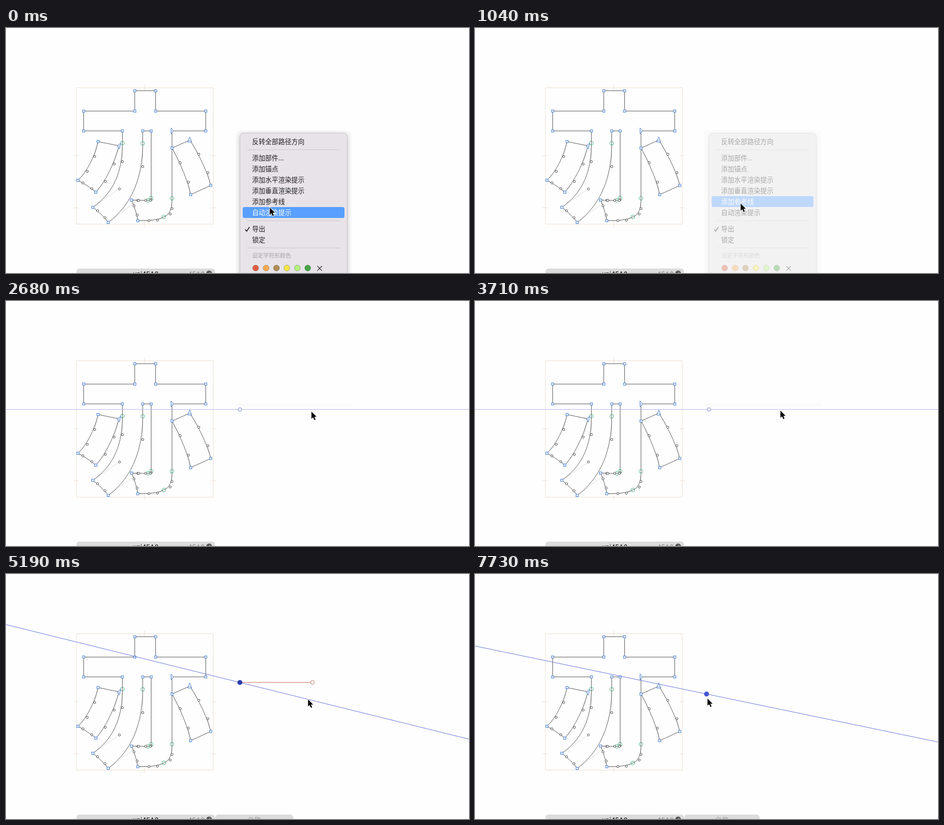
These frames come from a looping animation (933 by 494 pixels, 8000 ms). An HTML page:

```html
<!DOCTYPE html>
<html lang="zh-CN">
<head>
<meta charset="utf-8">
<title>添加参考线</title>
<style>
html, body { margin: 0; width: 100%; height: 100%; overflow: hidden; background: #fefefe; }
svg { display: block; width: 933px; height: 494px; }
text { font-family: "Noto Sans CJK SC", "Noto Sans CJK", sans-serif; }
.latin { font-family: Inter, "Noto Sans", sans-serif; font-size: 13px; }
#sheet { filter: drop-shadow(0 2px 3px rgba(0, 0, 0, .2)); }
</style>
</head>
<body>
<svg id="stage" viewBox="0 0 933 494">
  <g fill="none" stroke="#ecdfd2">
    <rect x="142" y="120.5" width="275.5" height="275"/>
    <path d="M279.5 114V126M279.5 390V401M136 257.5H147M412 257.5H423M136 362.5H147M412 362.5H423"/>
  </g>
  <g id="glyph"></g>
  <rect x="142" y="485" width="279" height="40" rx="6" fill="#dcdcdc"/>
  <text class="latin" x="281.5" y="501.2" text-anchor="middle">uni45A6</text>
  <text class="latin" x="400" y="501.2" text-anchor="end" fill="#858585">45A6</text>
  <circle cx="409.3" cy="494.5" r="5.6" fill="#575757"/>
  <path d="M406.5 494.5H412M409.6 492L412.2 494.5L409.6 497" fill="none" stroke="#ddd"/>
  <g id="panel">
    <rect id="panelBox" x="421.5" y="485" height="40" rx="6" fill="#dcdcdc"/>
    <text id="panelText" y="501" font-size="13.5" text-anchor="middle" fill="#a2a2a2">名称</text>
  </g>
  <rect id="strip" x="461" y="206" width="237" height="6" fill="#fafafa"/>
  <g id="guide">
    <line id="line" x1="0" x2="933"/>
    <g id="arm" fill="none" stroke="#cf6a60">
      <path d="M471 218.5H613.5"/>
      <circle cx="617.5" cy="218.5" r="4"/>
    </g>
    <circle id="knob"/>
  </g>
  <rect id="glow" height="320"/>
  <g id="menu"></g>
  <g id="cursor">
    <path id="badge" d="M6.5 15.5Q8.5 11.5 11 14.5M9.5 13.5H15.5V18.5H9.5ZM11.5 15.5H14" fill="none" stroke="#bdbdbd" stroke-width=".8"/>
    <path d="M0 0V14.6L3.3 11.5L5.8 17L8.3 16L5.8 10.6H10.3Z" stroke="#fff" stroke-width="1.8" paint-order="stroke"/>
  </g>
</svg>
<script>
const LOOP = 8000, BEAT = LOOP / 54;
const $ = id => document.getElementById(id);

function set(el, attrs) {
  for (const k in attrs) el.setAttribute(k, attrs[k]);
}
function add(parent, tag, attrs, text) {
  const el = document.createElementNS('http://www.w3.org/2000/svg', tag);
  set(el, attrs);
  if (text) el.textContent = text;
  return parent.appendChild(el);
}
const show = (el, on) => set(el, { visibility: on ? 'visible' : 'hidden' });
const within = (n, a, b) => n >= a && n < b;
const clamp = p => Math.min(1, Math.max(0, p));
const smooth = p => p * p * (3 - 2 * p);
const easeOut = (p, power) => 1 - (1 - clamp(p)) ** power;
const mix = (a, b, p) => a + (b - a) * p;

// Outline points: c corner, s smooth, o control point
const outlines = [
  `c334.5,207.5 c402.5,207.5 c402.5,167.5 c301.5,167.5 c301.5,126.5 c259.5,126.5 c259.5,167.5
   c156.5,167.5 c156.5,207.5 c234.5,207.5 s234.5,232 o234.5,269.5 o228.5,324.5 c175,361.5
   o184.5,368.5 o199.5,382.5 c206,392 o265.5,347.5 o275.5,279.5 s275.5,232.5 c275.5,207.5
   c292.5,207.5 s292.5,343 o292.3,346.5 o291,347.3 s286,347.5 o281.5,347.5 o267.5,347.5 c253,347
   o258,358.5 o264.3,377 c265.5,388.5 o288,388.5 o305,387.5 s318,381 o331,375 o334.5,364 s334.5,343.3`,
  `c227.5,237.5 c185.5,229 o178.7,259 o163.8,289 c145,307 o155,312.3 o173,324 c181,331
   o200.3,309.3 o218,274.3`,
  `c370.5,226 o388.5,254.5 o406.8,291.8 c412.5,317.5 c372,336 o367.5,310.7 o351,271.7 c334.5,242`
];
const startMarks = 'M332.5 201.5L338.5 207.5L332.5 213.5ZM231 232.3L228.7 244.2L223.7 238ZM370.3 219.5L366 230L374.5 230Z';

function drawGlyph() {
  const g = $('glyph');
  let arms = '', body = '';
  const pts = [];
  for (const src of outlines) {
    const list = src.trim().split(/\s+/).map((s, i) => {
      const [x, y] = s.slice(1).split(',');
      return { kind: s[0], x, y, at: x + ' ' + y, start: !i };
    });
    pts.push(...list);
    const ring = [...list, list[0]];
    body += 'M' + ring[0].at;
    for (let i = 1; i < ring.length; i++) {
      if (ring[i].kind !== 'o') { body += 'L' + ring[i].at; continue; }
      const [a, b, end] = ring.slice(i, i + 3);
      body += `C${a.at} ${b.at} ${end.at}`;
      arms += `M${ring[i - 1].at}L${a.at}M${b.at}L${end.at}`;
      i += 2;
    }
    body += 'Z';
  }
  add(g, 'path', { d: arms, fill: 'none', stroke: '#d2d2d2', 'stroke-width': .8 });
  add(g, 'path', { d: body, fill: 'none', stroke: '#444', 'stroke-width': .9 });
  for (const p of pts) {
    if (p.kind === 'o') add(g, 'circle', { cx: p.x, cy: p.y, r: 2.2, fill: '#fefefe', stroke: '#333', 'stroke-width': .9 });
    else if (p.kind === 's') add(g, 'circle', { cx: p.x, cy: p.y, r: 3.8, fill: 'none', stroke: '#45b382' });
    else if (!p.start) add(g, 'rect', { x: p.x - 2.4, y: p.y - 2.4, width: 4.8, height: 4.8, fill: '#e6effb', stroke: '#4b80cf' });
  }
  add(g, 'path', { d: startMarks, fill: '#e6effb', 'fill-opacity': .6, stroke: '#4b80cf' });
}

// Menu groups start at their first row; rows are 22 apart
const groups = [
  [229.5, '反转全部路径方向'],
  [262.5, '添加部件...', '添加锚点', '添加水平渲染提示', '添加垂直渲染提示', '添加参考线', '自动渲染提示'],
  [405.5, '导出', '锁定']
];
const items = groups.flatMap(([top, ...names]) => names.map((name, i) => ({ name, y: top + 22 * i })));
const swatches = ['#e05c3e', '#f8a94d', '#af8d52', '#f2e647', '#b5ef7e', '#44a444'];
let bar, labels;

function drawMenu() {
  const m = $('menu');
  add(m, 'rect', { id: 'sheet', x: 471.5, y: 212, width: 216, height: 320, rx: 6.5, fill: '#e7e3e8', stroke: '#c6c3c7' });
  add(m, 'path', { d: 'M486 245.5H673M486 388.5H673M486 443.5H673', stroke: '#c9c5ca' });
  bar = add(m, 'rect', { x: 477, width: 205, height: 22, rx: 3.5, fill: '#589fff' });
  labels = items.map(({ name, y }) => add(m, 'text', { x: 496, y: y + 4.4, 'font-size': 13.2 }, name));
  add(m, 'text', { x: 496, y: 463.3, 'font-size': 11.2, fill: '#a5a2a6' }, '设定字符形颜色');
  add(m, 'path', { d: 'M482 406L485 409.7L490.7 401.2', fill: 'none', stroke: '#222', 'stroke-width': 1.7 });
  swatches.forEach((fill, i) => add(m, 'circle', { cx: 503 + 21 * i, cy: 484, r: 6, fill, stroke: '#000', 'stroke-opacity': .25 }));
  add(m, 'path', { d: 'M627.3 480L636.7 489.4M636.7 480L627.3 489.4', stroke: '#222', 'stroke-width': 1.2 });
}

// Beats at which things happen
const PICK = 3, FADE = 7, GUIDE = 8, TURN = 29, LET_GO = 36, DRAG = 41, DROP = 51;
const hub = { x: 471.3, y: 218.7 };

// Free cursor moves: beat, x, y
const path = [
  [0, 531.5, 362], [1, 532, 364], [PICK, 534.5, 354], [GUIDE, 535.5, 354], [12, 615, 222],
  [15, 613, 234.5], [18, 615.5, 223], [25, 615.5, 221], [LET_GO, 608, 247], [40, 474, 220],
  [DROP, 467, 248], [52, 468.5, 251]
];

function knobAt(n) {
  const p = easeOut((n - DRAG + 1) / 7, 4);
  return { x: mix(hub.x, 466.6, p), y: mix(hub.y, 242, p) };
}
function slopeAt(n) {
  return n < TURN ? 0 : n < LET_GO ? .2476 * easeOut((n - TURN + 1) / 7, 2) : .2075;
}
function cursorAt(n) {
  if (within(n, TURN, LET_GO)) {
    const a = Math.atan(slopeAt(n));
    return [hub.x + 141.5 * Math.cos(a), hub.y + 141.5 * Math.sin(a)];
  }
  if (within(n, DRAG, DROP)) {
    const k = knobAt(n);
    return [k.x - 2, k.y + 1.7];
  }
  const i = path.findLastIndex(s => s[0] <= n);
  const a = path[i], b = path[i + 1] || a;
  const p = i < 2 ? 0 : smooth((n - a[0]) / (b[0] - a[0] || 1));
  return [mix(a[1], b[1], p), mix(a[2], b[2], p)];
}

function drawMenuState(n) {
  const open = n < GUIDE, fading = n >= FADE;
  const chosen = n < PICK ? 6 : 5;
  show($('menu'), open);
  show($('glow'), open);
  show($('strip'), within(n, GUIDE, TURN));
  set($('menu'), { opacity: fading ? .37 : 1 });
  set($('glow'), fading
    ? { x: 461, y: 206, width: 237, rx: 0, fill: '#fbfbfb' }
    : { x: 463, y: 207, width: 233, rx: 9, fill: '#f7f6f7' });
  set(bar, { y: items[chosen].y - 11.5 });
  labels.forEach((el, i) => set(el, { fill: i === chosen ? '#fff' : '#1f1e20' }));
}

function drawGuide(n) {
  const picked = within(n, 20, 24) || n >= 26;
  const turning = within(n, TURN, LET_GO + 1);
  const right = turning ? 579 : 573.5;
  show($('guide'), n >= GUIDE);
  show($('panel'), picked);
  set($('panelBox'), { width: right - 421.5 });
  set($('panelText'), { x: (421.5 + right) / 2 });
  set($('arm'), { display: turning ? 'inline' : 'none' });
  const { x, y } = knobAt(n), k = slopeAt(n);
  set($('line'), { y1: y - x * k, y2: y + (933 - x) * k, stroke: picked ? '#6573d9' : '#b3b1ec' });
  const ink = within(n, TURN, DROP) ? '#2d3bad' : '#4452d4';
  set($('knob'), {
    cx: x, cy: y, r: picked ? 4.5 : 3.5,
    fill: picked ? ink : '#fefefe', stroke: picked ? ink : '#6f76da'
  });
}

function render(t) {
  const n = Math.floor((t + 10) / BEAT);
  drawMenuState(n);
  drawGuide(n);
  set($('cursor'), { transform: `translate(${cursorAt(n).join(' ')})` });
  show($('badge'), within(n, DRAG, DROP));
}

drawGlyph();
drawMenu();
const begin = performance.now();
function tick() {
  render((performance.now() - begin) % LOOP);
  requestAnimationFrame(tick);
}
render(0);
requestAnimationFrame(tick);
</script>
</body>
</html>
```
